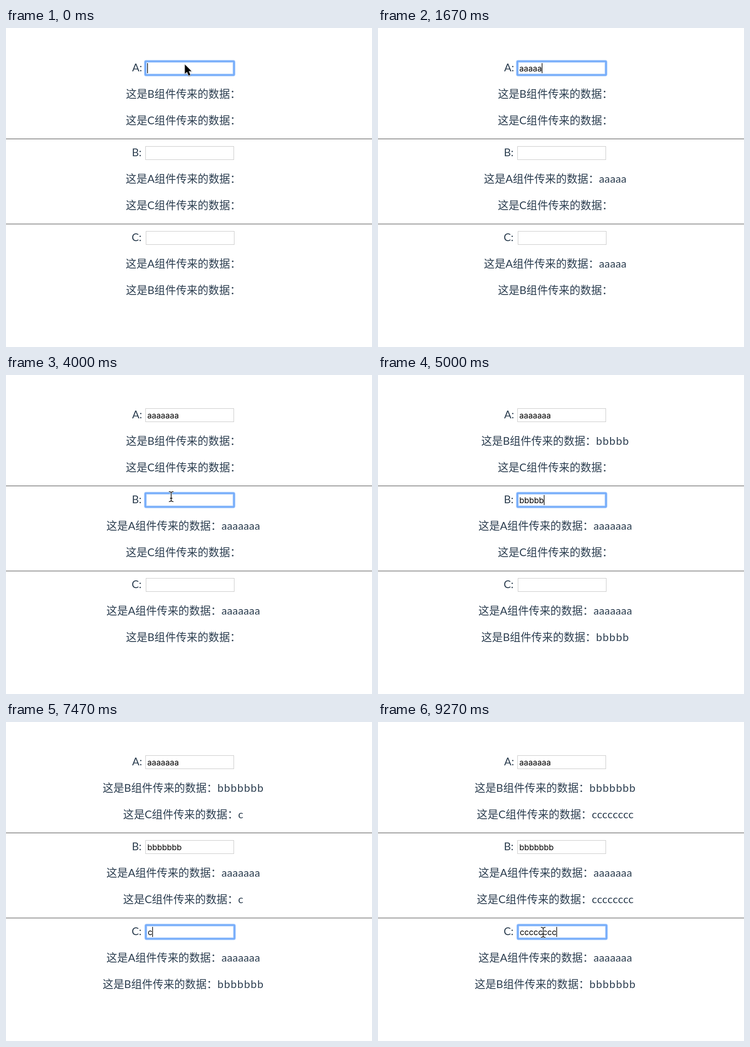
These frames come from a looping animation (801x699 px, 9.34 s). An HTML page:

```html
<!DOCTYPE html>
<html lang="zh-CN">
<head>
<meta charset="utf-8">
<title>组件传值</title>
<style>
html, body { margin: 0; width: 100%; height: 100%; overflow: hidden; background: #fff; }
svg { display: block; width: 801px; height: 699px; }
text { white-space: pre; }
.body { font: 400 23.6px Lato, "Noto Sans CJK SC", sans-serif; fill: #2c3e50; }
.han { font-weight: 350; }
.line { text-anchor: middle; }
.field { font: 400 17.6px Inter, "Liberation Sans", sans-serif; fill: #000; }
</style>
</head>
<body>
<svg id="stage" viewBox="0 0 801 699"></svg>
<script>
const LOOP = 9340, TICK = 200 / 3;
const stage = document.getElementById('stage');

function add(tag, attrs, parent = stage, text = '') {
  const el = document.createElementNS('http://www.w3.org/2000/svg', tag);
  for (const k in attrs) el.setAttribute(k, attrs[k]);
  if (text) el.textContent = text;
  parent.appendChild(el);
  return el;
}
const show = (el, on) => el.setAttribute('visibility', on ? 'visible' : 'hidden');

// Time of each key press, focus span and first caret phase per panel
const panels = [
  { name: 'A', x: 305, y: 73, labelX: 276, from: 0, to: 3070, blink: -170, gap: 0.35,
    keys: [930, 1130, 1330, 1470, 1670, 1870, 2070] },
  { name: 'B', x: 305, y: 259, labelX: 275.5, from: 3070, to: 6670, blink: 3100, gap: 1.35,
    keys: [4200, 4400, 4530, 4730, 4930, 5130, 5400] },
  { name: 'C', x: 306, y: 445, labelX: 275, from: 6670, to: LOOP, blink: 6670, gap: 0.4,
    keys: [7470, 7800, 7930, 8070, 8270, 8400, 8600, 8800] }
];

for (const y of [242, 428.5]) {
  add('rect', { x: 0, y, width: 801, height: 2, fill: '#959595' });
}

// Focus glow, from the faint rim to the core
const glow = [['#dbe9fe', 6.6], ['#a3c9fc', 5], ['#74abfa', 3.2]];

for (const p of panels) {
  const { x, y } = p;
  add('text', { class: 'body', x: p.labelX, y: y + 22 }, stage, p.name + ':');
  add('rect', { x: x + .5, y: y + .5, width: 193, height: 29, fill: '#fff', stroke: '#c6c6c6' });
  p.ring = add('g', { fill: 'none' });
  for (const [stroke, width] of glow)
    add('rect', { x, y, width: 194, height: 30, rx: 1.5, stroke, 'stroke-width': width }, p.ring);
  p.input = add('text', { class: 'field', x: x + 4.2, y: y + 22 });
  p.caret = add('rect', { y: y + 4, width: 1.4, height: 22, fill: '#000' });
  p.lines = panels.filter(q => q !== p).map((q, i) => {
    const el = add('text', { class: 'body line', x: 388, y: y + 80 + i * 57.7 });
    add('tspan', { class: 'han' }, el, '这是');
    add('tspan', {}, el, q.name);
    add('tspan', { class: 'han' }, el, '组件传来的数据：');
    return { from: q, data: add('tspan', { 'letter-spacing': q.gap }, el) };
  });
}

const arrow = add('path', {
  d: 'M0 0V20.2L4.7 15.9L8.2 24.2L11.9 22.6L8.4 14.4H14.4Z',
  fill: '#000', stroke: '#fff', 'stroke-width': 1.6, 'paint-order': 'stroke',
  style: 'filter:drop-shadow(0 1px 1.2px rgba(0,0,0,.4))'
});
const beam = add('g', { fill: 'none' });
const beamPath = 'M-5 -11Q-.8 -11 0 -8.5Q.8 -11 5 -11M0 -8.5V8.5M-5 11Q-.8 11 0 8.5Q.8 11 5 11M-2.6 3.6H2.6';
add('path', { d: beamPath, stroke: '#fff', 'stroke-width': 3.4 }, beam);
add('path', { d: beamPath, stroke: '#111', 'stroke-width': 1.6 }, beam);

// Pointer stops: time, x, y
const moves = [
  [0, 391.5, 80], [70, 392, 88], [930, 392, 88], [2330, 392, 88], [2470, 387, 145],
  [2600, 376, 238], [2800, 363, 262], [2930, 361.5, 266.5], [5730, 361.5, 266.5],
  [5930, 363, 292], [6200, 366, 390], [6400, 363, 448], [6530, 361.5, 461], [LOOP, 361.5, 461]
];
const hidden = [[930, 2330], [4200, 5670], [7470, 9270]];
const within = (t, [a, b]) => t >= a && t < b;

function pointerAt(t) {
  const i = Math.max(0, moves.findIndex(m => m[0] > t) - 1);
  const [t0, x0, y0] = moves[i], [t1, x1, y1] = moves[i + 1];
  const k = (t - t0) / (t1 - t0);
  return [x0 + (x1 - x0) * k, y0 + (y1 - y0) * k];
}

// The text pointer shows over fields and lines of text
function overText(y) {
  return panels.some(p => within(y, [p.y, p.y + 30]) ||
    [71, 129].some(d => Math.abs(y - p.y - d) < 16));
}

function draw(now) {
  const t = now % LOOP;
  for (const p of panels) {
    const pressed = p.keys.filter(k => k <= t);
    p.value = p.name.toLowerCase().repeat(pressed.length);
    if (p.input.textContent !== p.value) p.input.textContent = p.value;
    const focus = within(t, [p.from, p.to]);
    const since = t - (pressed.length ? pressed[pressed.length - 1] : p.blink);
    show(p.ring, focus);
    show(p.caret, focus && Math.floor(since / 500) % 2 === 0);
    p.caret.setAttribute('x', p.x + 4 + (p.value ? p.input.getComputedTextLength() : 0));
  }
  for (const p of panels) for (const l of p.lines)
    if (l.data.textContent !== l.from.value) l.data.textContent = l.from.value;

  const step = Math.min(t, Math.floor((t + 4) / TICK) * TICK);
  const [x, y] = pointerAt(step);
  const seen = !hidden.some(h => within(t, h));
  const text = t >= 70 && overText(y);
  show(arrow, seen && !text);
  show(beam, seen && text);
  for (const el of [arrow, beam]) el.setAttribute('transform', `translate(${x} ${y})`);
}

function loop() {
  draw(performance.now());
  requestAnimationFrame(loop);
}
loop();
</script>
</body>
</html>
```
